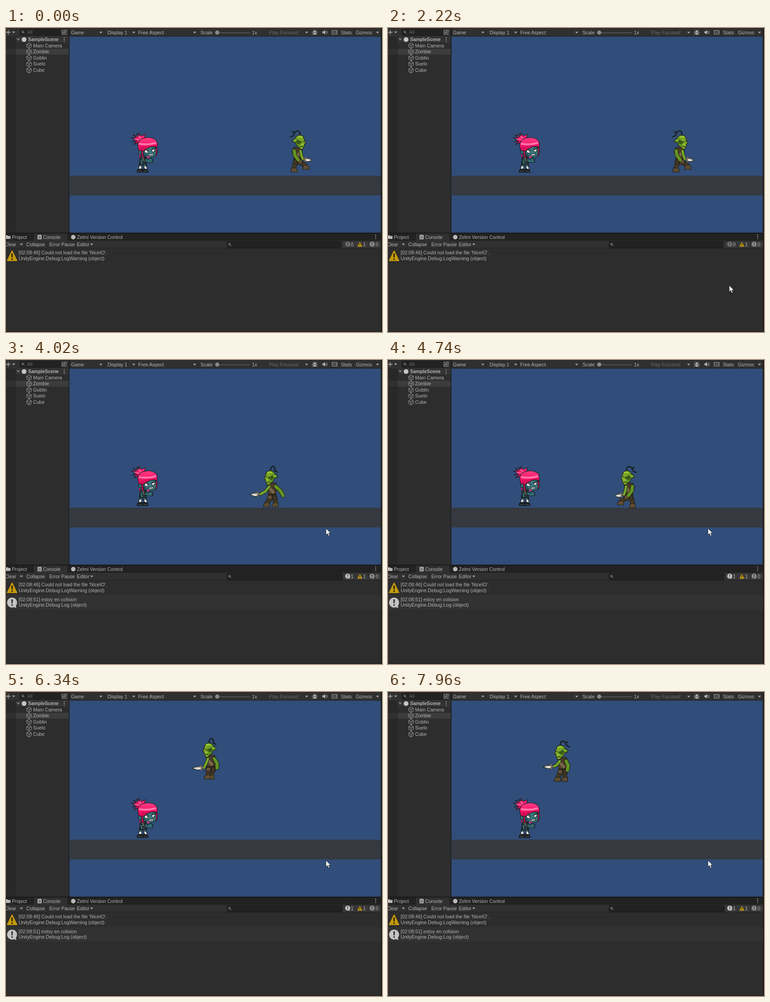
Recreate the animation shown at these times as an HTML page. Size 833x673 px, loop 8 s.

```html
<!DOCTYPE html>
<html lang="en">
<head>
<meta charset="utf-8">
<title>Game view</title>
<style>
html, body { margin: 0; width: 100%; height: 100%; overflow: hidden; background: #2d2d2d; }
svg { display: block; width: 833px; height: 673px; }
text { font: 10.65px "Liberation Sans", Arial, sans-serif; fill: #b4b4b4; white-space: pre; }
.dim { fill: #686868; }
.line { fill: none; stroke: #a8a8a8; }
.ink { stroke: #15181a; stroke-width: 1.1; stroke-linejoin: round; }
.gob { stroke: #1d200f; stroke-width: 1.2; stroke-linejoin: round; }
</style>
</head>
<body>
<svg viewBox="0 0 833 673">
  <defs>
    <g id="cube" class="line"><path d="M0-6 5-3V3L0 6-5 3V-3ZM-5-3 0 0 5-3M0 0V6"/></g>
    <path id="caret" d="M-3.5-1.8H3.5L0 2.2Z" fill="#a0a0a0"/>
    <g id="lens" class="line"><circle r="2"/><path d="M1.5 1.5 4 4"/></g>
    <g id="dots" fill="#b0b0b0"><circle cy="-4" r="1.1"/><circle r="1.1"/><circle cy="4" r="1.1"/></g>
    <g id="bubble">
      <path d="M0-11A11 11 0 0 1 8.5 7L9.5 12 4 10.2A11 11 0 1 1 0-11Z"/>
      <path d="M-1.8-7H1.8L1.2 2H-1.2ZM-1.6 4H1.6V7H-1.6Z" fill="#2d2d2d"/>
    </g>
    <g id="warn">
      <path d="M0-11 10.5 10.5H-10.5Z" fill="#c49a0c" stroke="#c49a0c" stroke-width="2" stroke-linejoin="round"/>
      <path d="M-1.8-5H1.8L1.2 4H-1.2ZM-1.6 6H1.6V9H-1.6Z" fill="#2b2510"/>
    </g>
    <linearGradient id="pink" x2="0" y2="1">
      <stop stop-color="#ff3d84"/><stop offset=".55" stop-color="#fb176c"/><stop offset="1" stop-color="#c60c52"/>
    </linearGradient>
    <linearGradient id="skin" x2="1" y2=".6">
      <stop stop-color="#8fc12a"/><stop offset="1" stop-color="#527f1e"/>
    </linearGradient>
    <linearGradient id="hide" x2="1">
      <stop stop-color="#594935"/><stop offset="1" stop-color="#382d20"/>
    </linearGradient>
  </defs>

  <!-- hierarchy -->
  <rect width="833" height="673" fill="#2d2d2d"/>
  <rect width="833" height="19" fill="#303030"/>
  <path d="M0 0H833" stroke="#1c1c1c"/>
  <rect y="19" width="22" height="434" fill="#282828"/>
  <rect x="22" y="19" width="118" height="13" fill="#333"/>
  <rect y="46" width="22" height="13" fill="#303030"/>
  <rect x="22" y="46" width="118" height="13" fill="#3c3c3c"/>
  <path d="M0 9.5H10M5 4.5V14.5" stroke="#b4b4b4" stroke-width="1.4"/>
  <use href="#caret" x="17" y="9.5"/>
  <rect x="30.5" y="2.5" width="104" height="14" rx="3" fill="#222" stroke="#1b1b1b"/>
  <use href="#lens" x="37" y="8.5"/>
  <rect x="122" y="3" width="13" height="13" fill="#303030"/>
  <path class="line" d="M127 5H124V14H133V11M129 4.5H133.5V9H129Z"/>
  <circle class="line" cx="128" cy="10" r="1.5"/>
  <path d="M23 23H31L27 28Z" fill="#777"/>
  <circle cx="40" cy="25.5" r="5.3" fill="#c6c6c6"/>
  <use href="#dots" x="129" y="25.5"/>
  <g id="cubes"></g>

  <!-- game view -->
  <rect x="139" width="2" height="454" fill="#191919"/>
  <rect x="140.5" y="19" width="690" height="434" fill="#314d79"/>
  <rect x="140.5" y="327" width="690" height="43.5" fill="#36393f"/>
  <rect x="830.5" width="2.5" height="673" fill="#1a1a1a"/>
  <path d="M141 18.5H831" stroke="#202020"/>
  <path d="M217.5 1V18M289.5 1V18M425.5 1V18M673.5 1V18M694.5 1V18M717.5 1V18M738.5 1V18M771.5 1V18M815.5 1V18" stroke="#272727"/>
  <path d="M463 10.5H540" stroke="#5c5c5c" stroke-width="1.3"/>
  <circle cx="468" cy="10" r="4.5" fill="#8b8b8b"/>
  <ellipse cx="684" cy="10.5" rx="3.3" ry="4.5" fill="#b4b4b4"/>
  <path d="M678 6 682 9M690 6 686 9M677.5 10.5H690.5M678 15 682 12M690 15 686 12M681 3.5 684 6 687 3.5" class="line"/>
  <path d="M681 10.5H687" stroke="#303030"/>
  <path d="M701 7.5H703.5L707 4.5V14.5L703.5 11.5H701Z" fill="#b4b4b4"/>
  <path class="line" d="M708.5 7Q710.5 9.5 708.5 12M710.5 5.5Q713 9.5 710.5 13.5"/>
  <rect x="722.5" y="5.5" width="11" height="8" class="line"/>
  <path d="M724 8H733M724 10.5H733" class="line" stroke-dasharray="1.5 1"/>

  <!-- console -->
  <rect y="453" width="833" height="2" fill="#191919"/>
  <rect y="455" width="831" height="16" fill="#222"/>
  <rect x="62" y="455" width="74" height="16" fill="#303030"/>
  <rect y="471" width="831" height="17" fill="#303030"/>
  <path d="M0 487.5H831M41.5 472V487M91.5 472V487M153.5 472V487" stroke="#222"/>
  <path d="M0 459H4L5.5 460.5H10V467H0Z" fill="#b8b8b8"/>
  <rect x="70" y="458" width="9" height="10" rx="1" fill="#b8b8b8"/>
  <path d="M71.5 461H77.5M71.5 463.5H77.5M71.5 466H77.5" stroke="#303030"/>
  <circle cx="149" cy="463" r="5" fill="#b8b8b8"/>
  <use href="#dots" x="819" y="462"/>
  <rect id="field" x="489.5" y="472.5" height="14" rx="3" fill="#222" stroke="#1a1a1a"/>
  <use href="#lens" x="495" y="478.5"/>
  <path d="M747 472H773V486H747ZM775 472H801V486H775ZM804 472H830V486H804Z" fill="#393939"/>
  <use id="badge" href="#bubble" transform="translate(757 478.5)scale(.5)"/>
  <use href="#warn" transform="translate(784 479)scale(.45)"/>
  <use href="#bubble" transform="translate(811 478.5)scale(.5)" fill="#8d8d8d"/>
  <use href="#warn" x="13.5" y="504.5"/>
  <g id="log">
    <rect y="520.5" width="831" height="32.5" fill="#323232"/>
    <use href="#bubble" x="13.5" y="537" fill="#c4c4c4"/>
    <text x="28" y="533.5">[02:08:51] estoy en colision</text>
    <text x="28" y="546">UnityEngine.Debug:Log (object)</text>
  </g>
  <path d="M0 672.5H833" stroke="#1b1b1b"/>
  <g id="labels"></g>
  <text id="count" x="764" y="483"></text>

  <!-- zombie -->
  <g id="zombie">
    <path class="ink" fill="#3a7479" d="M296 298 303 300 300 310H295ZM304 300 310 298 312 310H306Z"/>
    <path class="ink" d="M294.5 306 301 305 300 313H294ZM305 306 310 305 313 311 308 314Z" fill="#dfe6e3"/>
    <path class="ink" fill="#1c2022" d="M290.500 315Q296 310 303 313Q309 310 315 315.500V319.500H290.500Z"/>
    <path d="M292 317H302M305 317H314" stroke="#596060"/>
    <path class="ink" fill="#262f31" d="M297 284H311L310 294 312 303 304 301 296 303Z"/>
    <path d="M300 287 307 289 302 292 308 295M299 298 306 299" fill="none" stroke="#7d8c86" stroke-width="1.2"/>
    <path class="ink" fill="#347278" d="M307 289 315 291 321 287 322 290 326 291 323 294 326 297 318 298 309 296ZM297 289 301 291 304 300 299 302Z"/>
    <path d="M310 293H320" stroke="#214d54"/>
    <path class="ink" fill="#387a80" d="M300 263H333L335 274 331 284 320 287 305 282Z"/>
    <path d="M302 273 311 280 316 287 306 283Z" fill="#234f57"/>
    <circle class="ink" cx="311.5" cy="272.5" r="4.3" fill="#eef3ee"/>
    <circle class="ink" cx="326.5" cy="271" r="3.6" fill="#eef3ee"/>
    <circle cx="313" cy="273" r=".9"/><circle cx="328" cy="272" r=".9"/>
    <path d="M305 268 316 272M322 270 331 266" stroke="#15181a" stroke-width="1.6"/>
    <path class="ink" fill="#f4f6f2" d="M314 280 325 278 328 281 318 283Z"/>
    <path d="M318 280V283M322 279V282" stroke="#304a4a" stroke-width=".8"/>
    <ellipse class="ink" cx="297" cy="275" rx="3.2" ry="4.800" fill="#347278"/>
    <path class="ink" fill="#e31360" d="M299 265 303 267 304 282 308 289 301 285ZM331 263 335.500 267 334.500 280 331 283 333 273Z"/>
    <path d="M312 284 319 284 315 289Z" fill="#f12a74"/>
    <path d="M294 281 298 281 297 288Z" fill="#c41555"/>
    <path class="ink" fill="url(#pink)" d="M299 251 283 258 290 250 280 252 288 247 277.500 243 289 243 282 236.500 293 241 289 234 296 239 294 232 300 239 309 235.500 306 246Z"/>
    <path d="M285 246 298 248M293 239 300 246" stroke="#ff86b2" stroke-width="1.5"/>
    <path class="ink" fill="url(#pink)" d="M292 261Q291 249 303 244.500Q319 239.500 331 247Q338 255 334 264Q329 262 322 263Q311 266 304 273L294 271Z"/>
    <path d="M295 254Q313 258 332 252L333 256Q314 262 294 258Z" fill="#ff78ad"/>
    <path d="M298 267Q315 260 333 261" fill="none" stroke="#a70c45"/>
  </g>
  <g id="goblin"></g>
  <path id="cursor" d="M0 0V14L3.2 11 5.6 16.5 8 15.5 5.6 10.2H10Z" fill="#fff" stroke="#222" stroke-width=".8"/>
</svg>
<script>
const $ = id => document.getElementById(id);

const labels = [
  [47, 13, 'All', 'dim'], [144, 13.5, 'Game'], [225, 13.5, 'Display 1'], [293, 13.5, 'Free Aspect'],
  [431, 13.5, 'Scale'], [545, 13.5, '1x'], [583, 13.5, 'Play Focused', 'dim'], [742, 13.5, 'Stats'],
  [775, 13.5, 'Gizmos'], [13, 467, 'Project'], [82, 467, 'Console'], [157, 467, 'Zelmi Version Control'],
  [-3, 483, 'Clear'], [45, 483, 'Collapse'], [96, 483, 'Error Pause'], [157, 483, 'Editor'],
  [791, 483, '1'], [819, 483, '0'],
  [28, 501, "[02:08:46] Could not load the file 'NiceIO'."],
  [28, 514, 'UnityEngine.Debug:LogWarning (object)']
];
const objects = ['Main Camera', 'Zombie', 'Goblin', 'Suelo', 'Cube'];
objects.forEach((name, i) => labels.push([60, 42.5 + i * 13.6, name]));
$('labels').innerHTML = labels.map(([x, y, s, c = '']) => `<text x="${x}" y="${y}" class="${c}">${s}</text>`).join('') +
  '<text x="49" y="29" style="font-weight:bold;font-size:10.4px">SampleScene</text>' +
  [[210, 10], [283, 10], [418, 10], [666, 10], [823, 10], [34, 479], [190, 479]]
    .map(([x, y]) => `<use href="#caret" x="${x}" y="${y}"/>`).join('');
$('cubes').innerHTML = objects.map((_, i) => `<use href="#cube" x="51" y="${39 + i * 13.6}"/>`).join('');

// Goblin poses, facing left: hand, blade tip, back hand, front leg, back leg, front foot lift, upper body lean, long hair
const poses = {
  side: { hand: [-12, 65], tip: [-38, 66], back: 17, legs: [-3, 5], lift: 0, lean: 1, curl: 0 },
  reach: { hand: [-31, 43], tip: [-61, 41], back: 15, legs: [-9, 9], lift: 0, lean: -4, curl: 1 },
  low: { hand: [-17, 57], tip: [-41, 58], back: 13, legs: [-8, 8], lift: 0, lean: 0, curl: 1 },
  stride: { hand: [-9, 63], tip: [-30, 66], back: 1, legs: [-15, 11], lift: 4, lean: 0, curl: 1 },
  push: { hand: [-26, 62], tip: [-49, 63], back: 24, legs: [-11, 8], lift: 0, lean: -2, curl: 0 }
};

const limb = (pts, color, w) => [['#1d200f', w + 2], [color, w]].map(([c, n]) =>
  `<polyline points="${pts}" fill="none" stroke="${c}" stroke-width="${n}" stroke-linejoin="round" stroke-linecap="round"/>`).join('');

function leg(x, lift, hip) {
  const y = 90 - lift;
  return limb([hip, 70, x, y - 9], '#463926', 8) +
    `<path class="gob" fill="#5f4c35" d="M${x - 5} ${y - 9}H${x + 5}L${x + 6} ${y}H${x - 8}L${x - 8} ${y - 4}Z"/>`;
}

function blade([hx, hy], [tx, ty]) {
  const len = Math.hypot(tx - hx, ty - hy), turn = Math.atan2(ty - hy, tx - hx) * 180 / Math.PI;
  return `<g transform="translate(${hx} ${hy})rotate(${turn})">
    <path class="gob" fill="#e2deda" d="M6-3.5 ${len * .55}-4.5 ${len} 0 ${len * .55} 3.5 6 3Z"/>
    <path d="M8 1.5H${len - 7}" stroke="#9d9893" stroke-width="1.5"/>
    <path d="M0 0H7M6-5.5V5.5" stroke="#857556" stroke-width="2.5"/></g>`;
}

function drawGoblin(p) {
  const hair = p.curl ? 'M-3 12C-4-2 6-1 9 5C11 11 13 13 19 14M9 4 15 3' : 'M-1 12C-3-2 7-1 8 4V12M8 9 14 14';
  const shoulder = 10 + p.lean;
  const backArm = limb([shoulder, 45, (p.back + shoulder) / 2 + 3, 55, p.back, 65], '#639322', 7);
  const [hx, hy] = p.hand;
  const frontArm = limb([p.lean - 4, 45, (hx - 4) / 2, (hy + 50) / 2, hx, hy], '#76a82a', 5);
  return leg(p.legs[1], -p.lift / 2, 6) + leg(p.legs[0], p.lift, -2) + `
    <g transform="translate(${p.lean})">
      <path class="gob" fill="url(#hide)" d="M-8 38 10 37 15 46 10 59 13 73 4 76-9 73-6 60Z"/>
      <path d="M-5 43 9 57 4 62-7 49Z" fill="#78654a"/>
      <path d="M-7 63H11M3 64V74" stroke="#231b12" stroke-width="2.5"/>
      <path d="M-6 68H0" stroke="#6e5b41" stroke-width="4"/>
    </g>
    ${backArm}${frontArm}${blade(p.hand, p.tip)}
    <g transform="translate(${p.lean})">
      <path d="${hair}" fill="none" stroke="#171d1c" stroke-width="2.6"/>
      <path class="gob" fill="url(#skin)" d="M-11 18-10 13-4 10 2 11 7 14 8 18 14 21 13 25 6 28 5 33 0 37-5 41-9 41-11 36-13 33-12 30-16 28-13 24-13 20Z"/>
      <path d="M-13 22-4 24 3 20 6 25 1 31-4 28-10 26ZM-9 35-3 35-4 37-9 37Z" fill="#35561a"/>
      <path d="M-9 15Q-4 12 2 15M-11 30-5 31M-8 39-4 39M6 21 11 22" fill="none" stroke="#add63c" stroke-width="2"/>
      <path d="M-10 25H-6" stroke="#d6cf58" stroke-width="1.2"/>
    </g>`;
}

const sprites = {};
for (const name in poses) {
  const g = sprites[name] = document.createElementNS('http://www.w3.org/2000/svg', 'g');
  g.innerHTML = drawGoblin(poses[name]);
  $('goblin').append(g);
}

// Linear path through [time, value...] keys
function along(keys, t, k = 1) {
  let i = 1;
  while (i < keys.length - 1 && keys[i][0] < t) i++;
  const [a, b] = [keys[i - 1], keys[i]];
  const u = Math.min(1, Math.max(0, (t - a[0]) / (b[0] - a[0])));
  return a[k] + (b[k] - a[k]) * u;
}

const walk = [[3020, 655], [4020, 583], [4740, 525], [5540, 454], [5640, 450], [6340, 444], [7260, 442], [7360, 438], [7960, 378]];
const mouse = [[2120, 771, 604], [2220, 756, 570], [2520, 735, 475], [2820, 709, 373]];

function poseAt(t) {
  if (t < 2320) return 'stride';
  const u = ((t - 3020) / 1107 + 1) % 1;
  return u < .12 ? 'side' : u < .42 ? 'reach' : u < .5 ? 'low' : u < .82 ? 'stride' : u < .97 ? 'push' : 'side';
}

// Two equal jumps, given by the time of their peaks
const rise = t => Math.max(0, ...[6.18, 8.18].map(peak => 138 - 225 * (t / 1000 - peak) ** 2));

function render(now) {
  const time = now % 8000;
  const shift = time < 4740 ? 20 : time < 7360 ? 40 : 60;
  const t = Math.floor((time - shift) / 100) * 100 + shift;
  const fall = Math.min(1, Math.max(0, (t - 2220) / 200)) ** 2;

  $('zombie').setAttribute('transform', `translate(0 ${3 * fall})`);
  const dir = t < 2720 ? -1 : 1;
  $('goblin').setAttribute('transform', `translate(${along(walk, t)} ${227 + 8 * fall - rise(t)})scale(${dir} 1)translate(6.5 0)`);
  const pose = poseAt(t);
  for (const name in sprites) sprites[name].style.display = name === pose ? '' : 'none';

  const hit = t >= 2420;
  $('log').style.display = hit ? '' : 'none';
  $('badge').setAttribute('fill', hit ? '#c4c4c4' : '#707070');
  $('count').textContent = hit ? 1 : 0;
  $('field').setAttribute('width', hit ? 256 : 253);

  const [x, y] = time < 510 ? [796, 657] : t < 2220 ? [771, 604] : [along(mouse, t), along(mouse, t, 2)];
  $('cursor').setAttribute('transform', `translate(${x} ${y})`);
  $('cursor').style.display = time < 390 ? 'none' : '';
}

function tick() {
  render(performance.now());
  requestAnimationFrame(tick);
}
tick();
</script>
</body>
</html>
```
